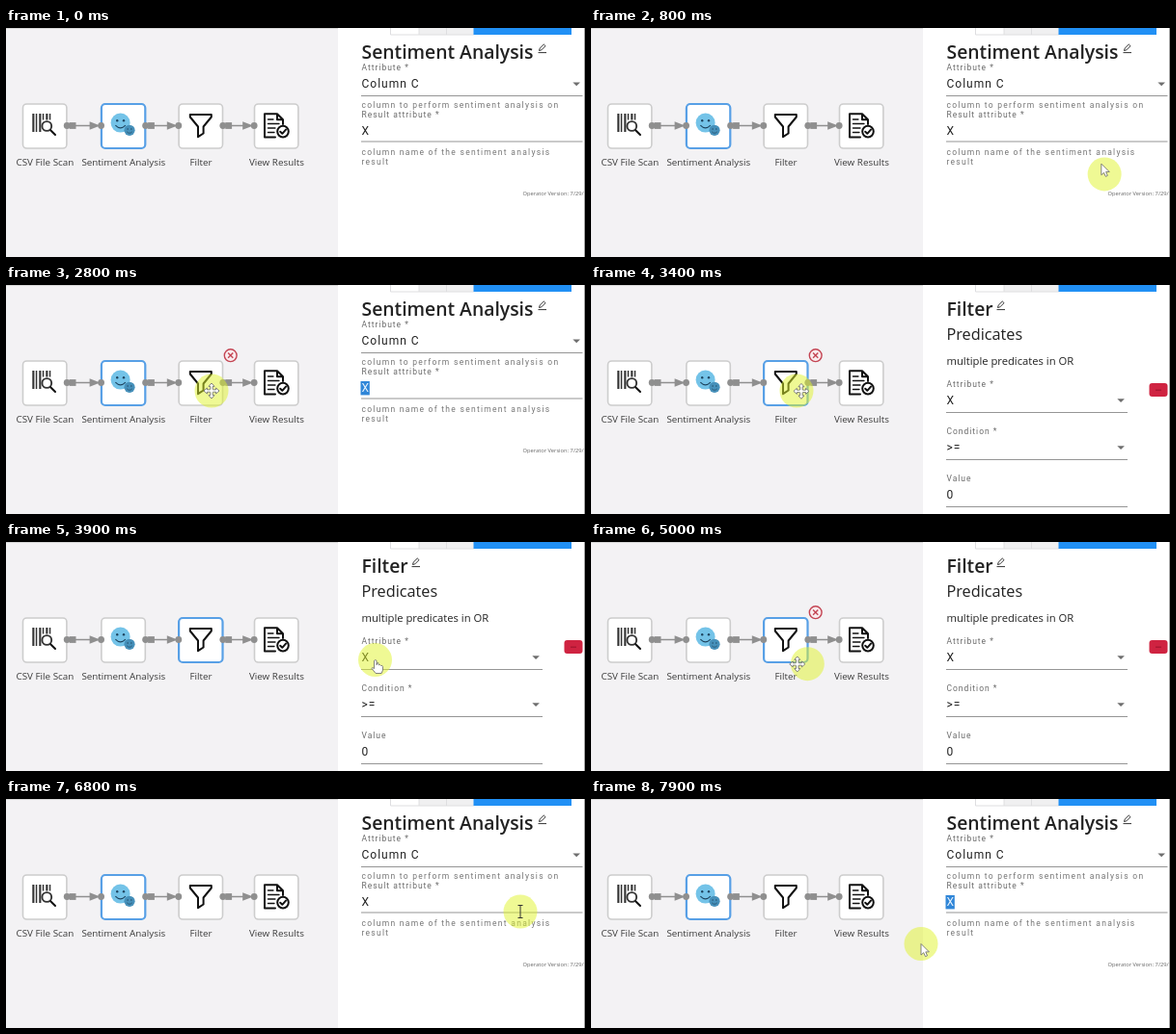
An HTML page for the animation above (8 s loop, 600x238 px).

```html
<!DOCTYPE html>
<html lang="en">
<head>
<meta charset="utf-8">
<title>Workflow editor</title>
<style>
  html, body { margin: 0; width: 100%; height: 100%; overflow: hidden; background: #f3f2f4; }
  svg { display: block; width: 100vw; height: 100vh; }
  text { font-family: "Open Sans", "Noto Sans", sans-serif; fill: #222; white-space: pre; }
  .name { font-size: 9.85px; fill: #3c3c3c; text-anchor: middle; }
  .title { font-size: 19.35px; font-weight: 600; }
  .sub { font-size: 16.25px; }
  .note { font-size: 11.24px; }
  .version { font-size: 5.75px; fill: #666; }
  .label, .hint, .value { font-family: Roboto, "Open Sans", sans-serif; }
  .label { font-size: 8.5px; letter-spacing: .98px; fill: #6b6b6b; }
  .hint { font-size: 8.5px; letter-spacing: 1.28px; fill: #777; }
  .value { font-size: 12px; letter-spacing: 1px; }
  .rule { stroke: #959595; }
  .caret { fill: #6e6e6e; }
  .wire { fill: #8f8f8f; stroke: #8f8f8f; stroke-width: 1.5; }
  .wire * { stroke-width: 0; }
  .wire path { stroke-width: 1.5; }
  .box { fill: #fff; stroke: #cdcdcd; stroke-width: 1.6; }
  .box.on { stroke: #58a0e6; stroke-width: 2.2; }
  .line { fill: none; stroke: #111; stroke-width: 2; stroke-linejoin: round; stroke-linecap: round; }
  .thin { stroke-width: 1.3; }
  .pointer { fill: #fff; stroke: #666; stroke-width: .8; stroke-linejoin: round; }
</style>
</head>
<body>
<svg viewBox="0 0 600 238" preserveAspectRatio="none">
  <defs>
    <path id="pencil" d="M1 6.5 1.6 4.2 5.8 0 7.5 1.7 3.3 5.9ZM0 8.6H8.5" fill="none" stroke="#333" stroke-linejoin="round"/>
    <path id="caret" class="caret" d="M-3.8-1.9H3.8L0 1.9Z"/>
    <g id="face">
      <circle r="10"/>
      <g fill="#1f4560"><circle cx="-3.4" cy="-2.4" r="1.2"/><circle cx="3.4" cy="-2.4" r="1.2"/></g>
      <path d="M-5.2 2.6Q0 8 5.2 2.6" fill="none" stroke="#1f4560" stroke-width="1.2"/>
    </g>
  </defs>

  <!-- workspace and side panel -->
  <rect width="600" height="238" fill="#f3f2f4"/>
  <path d="M0 .5H344" stroke="#d9d9d9"/>
  <rect x="344" width="256" height="238" fill="#fff"/>
  <rect x="428" width="57" height="7" fill="#f0f0f1"/>
  <path d="M398.5 0V7H485M428 0V7M456.5 0V7" fill="none" stroke="#dedee0"/>
  <rect x="484.5" width="101.5" height="7" fill="#2190f5"/>

  <g id="nodes"></g>
  <g id="wires" class="wire"></g>

  <!-- node icons -->
  <g id="scan" fill="#333">
    <circle cx="42.3" cy="102" r="4.9" fill="#fff" stroke="#333" stroke-width="1.9"/>
    <path class="line" d="M46.2 106.2 51 111"/>
  </g>
  <use href="#face" transform="translate(118.6 98.6)" fill="#74c3e8"/>
  <use href="#face" transform="translate(128 106.3) scale(.56)" fill="#4690ba"/>
  <path class="line" d="M190.8 90H212.8V92.5L204.6 102.5V109.5L199 113.2V102.5L190.8 92.5Z"/>
  <g class="line">
    <path d="M279 113.6H268V89.3H281L287 95.3V100M281 89.3V95.3H287"/>
    <path class="thin" d="M271.5 95H277M271.5 99.5H283M271.5 104H279M271.5 108.5H278"/>
    <circle cx="287" cy="107.6" r="5.8" fill="#fff"/>
    <path d="M284.2 107.7 286.3 109.8 290 105.6"/>
  </g>

  <g id="remove" stroke="#c44553" stroke-width="1.4">
    <circle r="6.4" fill="#f9ecee"/>
    <path d="M-2.6-2.6 2.6 2.6M2.6-2.6-2.6 2.6"/>
  </g>

  <g id="sentiment">
    <text class="title" x="368.5" y="31.5">Sentiment Analysis</text>
    <use href="#pencil" x="551.5" y="17"/>
    <text class="label" x="368.5" y="44">Attribute *</text>
    <text class="value" x="368.5" y="62">Column C</text>
    <use href="#caret" x="591.2" y="58.4"/>
    <path class="rule" d="M368 70.5H597.5M368 118H597.5"/>
    <text class="hint" x="368.5" y="82.7">column to perform sentiment analysis on</text>
    <text class="label" x="368.5" y="93">Result attribute *</text>
    <rect id="mark" x="367.5" y="100" width="9.3" height="14.4" fill="#2f86d8"/>
    <text id="result" class="value" x="368.5" y="111.3">X</text>
    <text class="hint" x="368.5" y="131.5">column name of the sentiment analysis</text>
    <text class="hint" x="368.5" y="141.5">result</text>
    <text class="version" x="535.5" y="174">Operator Version: 7/29/2022</text>
  </g>

  <g id="filter">
    <text class="title" x="368.5" y="31.5">Filter</text>
    <use href="#pencil" x="420.5" y="17"/>
    <text class="sub" x="368.5" y="56.5">Predicates</text>
    <text class="note" x="368.5" y="82.5">multiple predicates in OR</text>
    <g id="fields"></g>
    <rect x="578.5" y="102" width="19" height="14" rx="3" fill="#cf2341"/>
    <path d="M585 109.2H591" stroke="#a3152f" stroke-width="1.2"/>
  </g>
  <path d="M599.5 0V238" stroke="#a8a8a8"/>

  <circle id="halo" r="17.5" fill="#dff32a" opacity=".5"/>
  <g id="cursor">
    <path id="arrow" class="pointer" d="M0 0V11.6L2.7 9.2 4.5 13.2 6.5 12.3 4.8 8.4H8.4Z"/>
    <g id="move"></g>
    <path id="hand" class="pointer" d="M-1 .8Q.3-.6 1.5.8V5.2Q3 0 3.8 5.4 5.2 4.4 6 6 7.6 5.4 8 7V10.5L6.6 14H.6L-3.6 8.8Q-3.2 7.2-1 9Z"/>
    <path id="beam" d="M-2.5-6.5H2.5M0-6.5V6.5M-2.5 6.5H2.5" fill="none" stroke="#333"/>
  </g>
</svg>
<script>
const LOOP = 8000, LAG = 50, PITCH = 80, MID = 101.5;
const $ = id => document.getElementById(id);
const show = (el, on) => el.setAttribute("visibility", on ? "visible" : "hidden");
const place = (el, [x, y]) => el.setAttribute("transform", `translate(${x} ${y})`);
const add = (id, html) => $(id).insertAdjacentHTML("beforeend", html);

const nodes = ["CSV File Scan", "Sentiment Analysis", "Filter", "View Results"]
  .map((name, i) => ({ name, x: 40.9 + PITCH * i }));
nodes[0].x -= .7;
nodes[1].x += .7;
nodes[2].x += .9;
nodes[3].x -= .7;

nodes.forEach(({ name, x }, i) => {
  add("nodes", `<rect class="box" x="${x - 22.7}" y="79" width="45.4" height="46" rx="4"/>
    <text class="name" x="${x + .2}" y="143">${name}</text>`);
  if (!i) return;
  const a = nodes[i - 1].x + 23, b = x - 23;
  add("wires", `<path d="M${a} ${MID}H${b - 8}"/>
    <polygon points="${b - 12},${MID - 4.2} ${b - 1},${MID} ${b - 12},${MID + 4.2}"/>
    <rect x="${a + 2.5}" y="${MID - 3.4}" width="6.8" height="6.8"/>
    <circle cx="${a}" cy="${MID}" r="3.4"/><circle cx="${b}" cy="${MID}" r="3.4"/>`);
});
const boxes = document.querySelectorAll(".box");

for (let i = 0; i < 6; i++)
  add("scan", `<rect x="${27.3 + 3.5 * i}" y="89" width="${i % 2 ? 1.5 : 2.1}" height="${i < 3 ? 19 : 6.5}"/>`);

[["Attribute *", "X"], ["Condition *", "&gt;="], ["Value", "0"]].forEach(([label, value], i) => {
  const y = 106 + 49 * i;
  add("fields", `<text class="label" x="368.5" y="${y}">${label}</text>
    <text class="value" x="368.5" y="${y + 18}">${value}</text>
    <path class="rule" d="M368 ${y + 26.5}H556"/>
    ${i < 2 ? `<use href="#caret" x="549.1" y="${y + 14.2}"/>` : ""}`);
});

const arm = "M-1.2-1.2V-4.6H-3L0-8 3-4.6H1.2V-1.2";
for (let i = 0; i < 4; i++) add("move", `<path class="pointer" d="${arm}" transform="rotate(${90 * i})"/>`);
add("move", `<rect x="-1.4" y="-1.4" width="2.8" height="2.8" fill="#fff"/>`);

// pointer moves: start, end, x, y
const home = [566, 262];
const moves = [
  [200, 1000, 522, 119],
  [1100, 1150, 392, 119],
  [1350, 1900, 338, 106],
  [2000, 2650, 213, 110],
  [3350, 3850, 382.5, 122.5],
  [4550, 5030, 212, 127],
  [5050, 5400, 122, 115.5],
  [5600, 6560, 533, 117],
  [7250, 7850, 342, 150.5]
];
const ease = p => p * p * (3 - 2 * p);

function pointAt(t) {
  return moves.reduce((from, [start, end, ...to]) => {
    const p = ease(Math.min(1, Math.max(0, (t - start) / (end - start))));
    return from.map((v, i) => v + (to[i] - v) * p);
  }, home);
}

function draw(t) {
  const pos = pointAt(t), [x, y] = pos;
  const filtering = t >= 2900 && t < 5500;
  const marked = (t >= 1600 && t < 2900) || t >= 7600;

  show($("filter"), filtering);
  show($("sentiment"), !filtering);
  show($("mark"), marked);
  $("result").style.fill = marked ? "#e8f2fc" : "";
  boxes.forEach((b, i) => b.classList.toggle("on", i === (filtering ? 2 : 1)));

  const over = nodes.find(n => Math.abs(x - n.x) < 25 && y > 76 && y < 129);
  show($("remove"), over);
  if (over) place($("remove"), [over.x + 30.9, 73.2]);

  const inField = x > 366 && y > 100 && y < 134;
  const kind = over ? "move" : !inField ? "arrow" : filtering ? "hand" : "beam";
  for (const k of ["arrow", "move", "hand", "beam"]) show($(k), k === kind);
  place($("cursor"), pos);
  place($("halo"), pointAt(t - LAG));
}

function tick() {
  draw(performance.now() % LOOP);
  requestAnimationFrame(tick);
}
tick();
</script>
</body>
</html>
```
